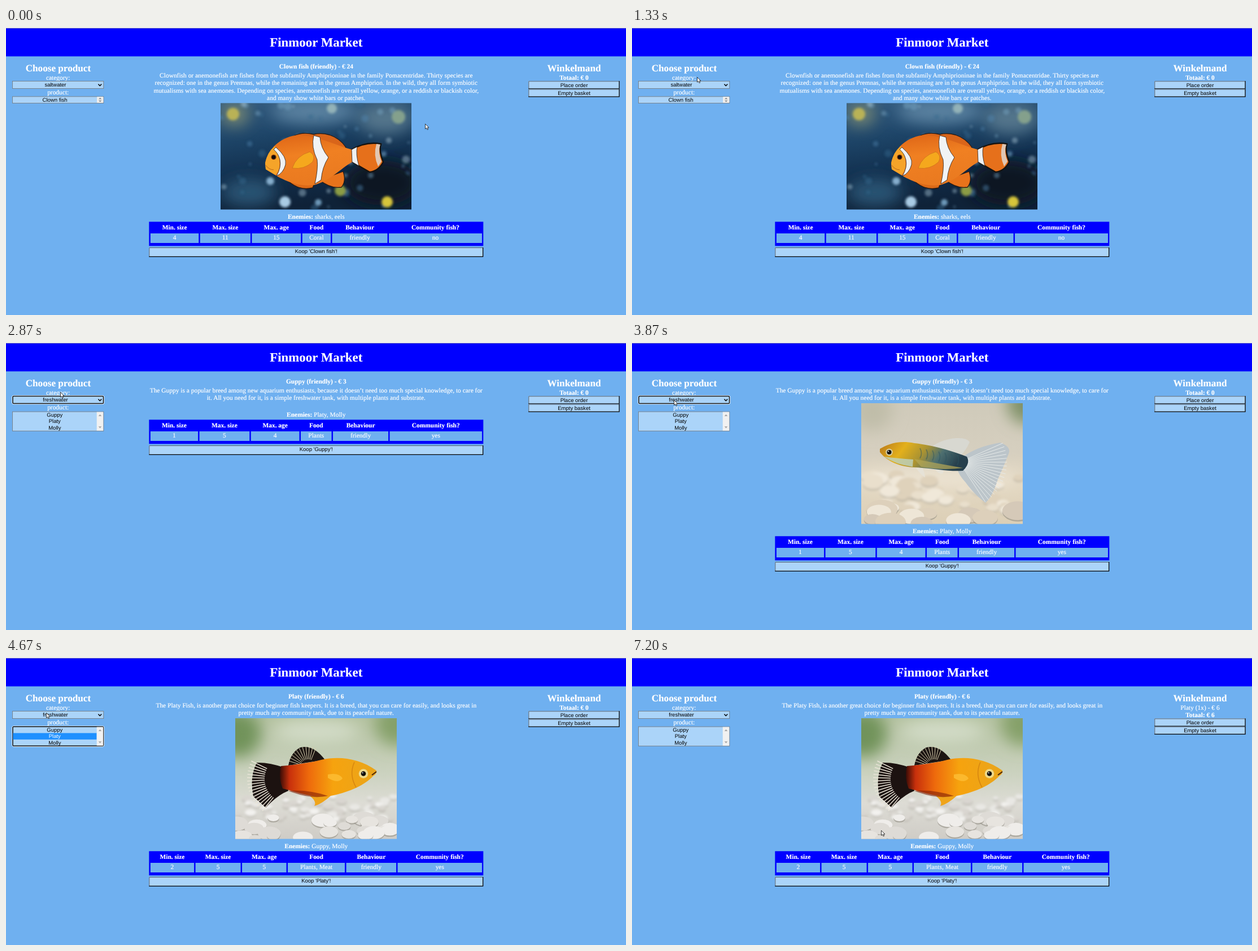
Animation, 1098 px wide and 510 px high, one loop 8 s. Source, as an HTML page:

```html
<!DOCTYPE html>
<html lang="en">
<head>
<meta charset="utf-8">
<title>Finmoor Market</title>
<style>
  html, body { margin: 0; width: 100%; height: 100%; overflow: hidden; background: #6fb0f0; }
  #stage { display: block; width: 100vw; height: 100vh; }
  text {
    font: 11.44px "Liberation Serif", "Times New Roman", serif; text-rendering: geometricPrecision;
    fill: #fff; stroke: #fff; stroke-width: .18px; text-anchor: middle;
  }
  .b { font-weight: bold; }
  .h1 { font-size: 22.87px; font-weight: bold; }
  .h2 { font-size: 17.16px; font-weight: bold; }
  .ui { font: 9.53px "Liberation Sans", Arial, sans-serif; fill: #000; stroke: none; }
  .ui.on { fill: #fff; }
</style>
</head>
<body>
<svg id="stage" viewBox="0 0 1098 510">
  <defs>
    <filter id="soft" x="-50%" y="-50%" width="200%" height="200%"><feGaussianBlur stdDeviation="2"/></filter>
    <filter id="haze" x="-50%" y="-50%" width="200%" height="200%"><feGaussianBlur stdDeviation="14"/></filter>
    <filter id="shadow" x="-20%" y="-30%" width="140%" height="160%"><feGaussianBlur stdDeviation="3.2"/></filter>
    <linearGradient id="sea" x2=".25" y2="1">
      <stop offset="0" stop-color="#345c80"/><stop offset=".35" stop-color="#1d4467"/><stop offset=".65" stop-color="#12304f"/><stop offset="1" stop-color="#0f2238"/>
    </linearGradient>
    <linearGradient id="clownSkin" x2=".2" y2="1">
      <stop offset="0" stop-color="#dd6416"/><stop offset=".45" stop-color="#f08022"/><stop offset="1" stop-color="#ea7a20"/>
    </linearGradient>
    <linearGradient id="sand" x2="0" y2="1">
      <stop offset="0" stop-color="#cfcaba"/><stop offset=".4" stop-color="#d6cfbf"/><stop offset=".65" stop-color="#e3d8c3"/><stop offset="1" stop-color="#dccfb6"/>
    </linearGradient>
    <linearGradient id="guppySkin" x2="1" y2=".25">
      <stop offset="0" stop-color="#b9781a"/><stop offset=".3" stop-color="#e3b01c"/><stop offset=".55" stop-color="#a99232"/>
      <stop offset=".75" stop-color="#4d6f70"/><stop offset="1" stop-color="#263f4c"/>
    </linearGradient>
    <linearGradient id="pond" x2="0" y2="1">
      <stop offset="0" stop-color="#b4c2a0"/><stop offset=".45" stop-color="#cbd2bf"/><stop offset=".7" stop-color="#dddcd5"/><stop offset="1" stop-color="#cfccc6"/>
    </linearGradient>
    <linearGradient id="platySkin" x2="1">
      <stop offset="0" stop-color="#3a0c06"/><stop offset=".1" stop-color="#c8300c"/><stop offset=".3" stop-color="#ee6a0c"/>
      <stop offset=".55" stop-color="#f6a30e"/><stop offset="1" stop-color="#e9a51c"/>
    </linearGradient>
  </defs>

  <rect width="1098" height="510" fill="#6fb0f0"/>
  <rect width="1098" height="50.4" fill="#00f"/>
  <rect width="1098" height="1" fill="#6d6fc4"/>
  <text class="h1" x="549.3" y="33.4">Finmoor Market</text>
  <text class="h2" x="92.4" y="77">Choose product</text>
  <text x="92.2" y="91.5">category:</text>
  <text x="92.2" y="118.3">product:</text>
  <text class="h2" x="1006" y="77">Winkelmand</text>
  <g id="view"></g>
  <path id="cursor" d="M.5.5V9.4L2.6 7.5 4.1 10.8 5.6 10.1 4.2 7H7Z" fill="#fff" stroke="#111" stroke-width=".8"/>
</svg>
<script>
const LIGHT = '#abd4f9', PAGE = '#6fb0f0', MARK = '#1e90ff';
const PERIOD = 8000, FRAME = 1000 / 15;

const rect = (x, y, w, h, fill, extra = '') =>
  `<rect x="${x}" y="${y}" width="${w}" height="${h}" fill="${fill}" ${extra}/>`;
const text = (x, y, s, cls = '') => `<text class="${cls}" x="${x}" y="${y}">${s}</text>`;
const path = (d, fill, extra = '') => `<path d="${d}" fill="${fill}" ${extra}/>`;
const dot = (x, y, r, fill, extra = '') => `<circle cx="${x}" cy="${y}" r="${r}" fill="${fill}" ${extra}/>`;
const oval = (x, y, rx, ry, fill, extra = '') =>
  `<ellipse cx="${x}" cy="${y}" rx="${rx}" ry="${ry}" fill="${fill}" ${extra}/>`;
const repeat = (n, fn) => Array.from({ length: n }, (_, i) => fn(i)).join('');

function button(x, y, w, h, label, baseline, pressed) {
  const [a, b] = pressed ? ['#000', '#5a6470'] : ['#5a6470', '#000'];
  return rect(x, y, w, h, LIGHT)
    + path(`M${x + .5} ${y + h}V${y + .5}H${x + w}`, 'none', `stroke="${a}" stroke-width="1"`)
    + path(`M${x} ${y + h - .65}H${x + w - .65}V${y}`, 'none', `stroke="${b}" stroke-width="1.3"`)
    + text(x + w / 2, baseline, label, 'ui');
}

function field(y, h, focused) {
  return focused
    ? rect(10.8, y - .7, 162.9, h + 1.4, 'none', 'rx="2.5" stroke="#fff" stroke-width="1"')
      + rect(12, y + .4, 160.5, h - .8, LIGHT, 'rx="1.6" stroke="#101010" stroke-width="1.5"')
    : rect(11.4, y + .4, 161.4, h - .8, LIGHT, 'stroke="#767676" stroke-width=".8"');
}

function random(seed) {
  return () => (seed = seed * 16807 % 2147483647) / 2147483647;
}

function stones(seed, n, box, size, colors) {
  const rnd = random(seed), [x, y, w, h] = box;
  return repeat(n, i => {
    const r = size * (.6 + rnd() * .7), cx = x + rnd() * w, cy = y + h * i / n;
    return oval(cx, cy + 2, r, r * .62, '#8f8a80', 'opacity=".55"') + oval(cx, cy, r, r * .6, colors[i % colors.length]);
  });
}

function rays(cx, cy, r0, r1, from, to, n, color, width) {
  return repeat(n, i => {
    const a = (from + (to - from) * i / (n - 1)) * Math.PI / 180, c = Math.cos(a), s = Math.sin(a);
    return path(`M${cx + r0 * c} ${cy + r0 * s}L${cx + r1 * c} ${cy + r1 * s}`, 'none',
      `stroke="${color}" stroke-width="${width}"`);
  });
}

const photo = (x, y, w, h, art) =>
  `<svg x="${x}" y="${y}" width="${w}" height="${h}" viewBox="${x} ${y} ${w} ${h}">${art}</svg>`;

function clownPhoto() {
  const rnd = random(77), tones = ['#4d83ad', '#7ba6c4', '#37698f', '#a9c5d4'];
  const bokeh = repeat(60, i => dot(380 + rnd() * 338, 133 + rnd() * 190, 2 + rnd() * 5, tones[i % 4], 'opacity=".45"'));
  const edge = 'stroke="#2a1a12" stroke-width="1.3"', rim = 'stroke="#2b211c" stroke-width=".8"';
  return photo(380, 133.5, 338, 189, rect(380, 133, 338, 190, 'url(#sea)')
    + `<g filter="url(#haze)">${oval(545, 148, 75, 22, '#5c83a2')}${oval(672, 160, 50, 28, '#54768c')}`
    + `${oval(405, 153, 24, 20, '#7b8a72')}${oval(430, 292, 48, 24, '#2a5575')}${oval(665, 275, 66, 40, '#0a1524')}</g>`
    + `<g filter="url(#soft)">${bokeh}${dot(402, 153, 11, '#b9b257')}${dot(577, 143, 9, '#93b2b8')}`
    + `${dot(695, 158, 12, '#84a08c')}${dot(592, 289, 10, '#8b9c45')}${dot(675, 309, 10, '#d6c53a')}`
    + `${dot(494, 309, 10, '#a9cbe4')}${dot(468, 272, 7, '#86aecd')}${dot(553, 310, 6, '#6d98b8')}</g>`
    + path('M509 192Q525 184 545 189Q558 186 573 190Q591 196 602 212L594 222 520 200Z', '#d9651a', edge)
    + path('M555 270Q578 262 597 255Q603 272 594 283Q575 286 555 270Z', '#e8731b', edge)
    + path('M500 272Q520 290 543 284L548 272Z', '#dc6a18', edge)
    + path('M612 216Q638 201 664 206Q660 218 668 238Q660 254 644 256Q628 247 612 237Z', '#e6701b', 'stroke="#17130f" stroke-width="2.4"')
    + path('M459 240C464 215 487 191 522 190C558 194 588 210 616 217L617 236C596 246 576 271 546 279C508 284 478 262 460 251Z', 'url(#clownSkin)')
    + path('M459 240Q463 220 476 210Q484 226 484 238Q486 252 477 261L460 251Z', '#f5a429')
    + path('M478 212Q498 229 495 243Q491 258 479 263Q488 247 485 234Q482 222 474 216Z', '#eef1f3', rim)
    + path('M545 191L556 194Q557 213 571 230Q560 247 558 270L547 277Q553 250 551 234Q540 212 545 191Z', '#f1f3f5', rim)
    + path('M612 216L622 211Q619 224 625 245L613 238Z', '#eef0f2', rim)
    + path('M656 206L663 207Q658 220 665 237L659 246Q650 226 656 206Z', '#dfe4e6', 'opacity=".75"')
    + path('M507 249Q514 227 538 220Q549 226 543 238Q528 252 507 249Z', '#f5a81d', 'stroke="#c8691a" stroke-width=".7"')
    + path('M460 244Q466 252 474 252', 'none', 'stroke="#b8651a" stroke-width="1"')
    + dot(474, 229.5, 4.6, '#7a2f0c') + dot(474, 229.5, 3.2, '#0d0c0c'));
}

function guppyPhoto() {
  return photo(406, 107, 286, 214.5, rect(406, 107, 286, 215, 'url(#sand)')
    + `<g filter="url(#haze)">${dot(700, 108, 36, '#7f9167')}${dot(425, 120, 36, '#c0bda9')}`
    + `${oval(540, 240, 150, 16, '#ece3d2')}</g>`
    + `<g filter="url(#soft)">${stones(31, 36, [406, 232, 286, 66], 15, ['#e9dfcc', '#dfd2bb', '#f0e8d9'])}</g>`
    + stones(9, 12, [406, 293, 286, 30], 24, ['#eee6d7', '#ddd0bb', '#d5c9b8'])
    + path('M522 191Q545 171 574 169Q593 168 598 176Q592 190 582 200Z', '#d9dad3', 'opacity=".9"')
    + path('M585 203Q610 184 652 177Q672 184 667 197Q658 220 648 242Q638 274 626 284Q606 269 591 248Q578 234 576 223Z', '#bcc5ca')
    + rays(580, 212, 14, 84, -24, 57, 18, '#e7ebea', 1)
    + path('M501 219Q510 233 519 239Q518 228 513 219ZM535 223Q548 238 552 229L549 222Z', '#e6e2d7')
    + path('M439 188C452 181 470 172 500 178C535 182 570 193 593 202Q600 214 586 227C560 229 530 222 500 221C475 220 452 211 439 194Z', 'url(#guppySkin)')
    + path('M446 202Q470 205 498 207L497 220Q468 216 446 202Z', '#bfd0b8', 'opacity=".85"')
    + path('M500 206Q545 215 586 222Q550 227 512 220Z', '#b7a956', 'opacity=".7"')
    + repeat(7, i => path(`M${510 + i * 11} ${187 + i * 2}q5 9 0 18`, 'none', 'stroke="#2d565f" stroke-width="2" opacity=".45"'))
    + dot(455.5, 194, 6.2, '#d8cfa4') + dot(455.5, 194, 4, '#15130f') + dot(454, 192.5, 1, '#fff'));
}

function platyPhoto() {
  return photo(406, 107, 286, 214.5, rect(406, 107, 286, 215, 'url(#pond)')
    + `<g filter="url(#haze)">${dot(410, 135, 42, '#71935a')}${dot(692, 118, 38, '#85a069')}`
    + `${oval(550, 130, 75, 20, '#d3dcc8')}</g>`
    + `<g filter="url(#soft)">${stones(53, 65, [406, 245, 286, 44], 8, ['#e9e8e4', '#d9d6d0', '#f3f2ef'])}</g>`
    + stones(17, 26, [406, 284, 286, 38], 17, ['#efedea', '#dedbd6', '#e7e4df'])
    + path('M500 191Q504 168 521 159Q544 153 565 181Z', '#1d1613')
    + rays(535, 194, 14, 37, 198, 292, 11, '#d9cfaf', 1)
    + path('M494 195Q465 185 444 186Q431 211 438 246L460 266Q480 244 500 236Z', '#1c1210')
    + rays(500, 215, 42, 73, 129, 206, 17, '#eae5d8', 1.5)
    + path('M538 245Q551 255 546 263Q560 259 576 244Z', '#efa41a')
    + path('M487 192C510 190 535 187 558 181C590 174 625 178 656 200Q657 206 650 210C635 226 610 237 580 244C548 251 520 239 490 232Q482 212 487 192Z', 'url(#platySkin)')
    + path('M500 236Q535 233 570 245Q540 252 500 236Z', '#812108', 'opacity=".6"')
    + path('M570 207Q590 203 596 214Q588 224 570 213Z', '#ffc43b', 'opacity=".7"')
    + path('M617 185Q607 207 620 230', 'none', 'stroke="#cb780d" stroke-width="1.5" opacity=".7"')
    + path('M648 208L656 202', 'none', 'stroke="#4a2308" stroke-width="2"')
    + dot(633, 205.5, 8.3, '#eed98a') + dot(633, 205.5, 4.3, '#0d0b0a') + dot(631.6, 204, 1, '#fff'));
}

const headings = ['Min. size', 'Max. size', 'Max. age', 'Food', 'Behaviour', 'Community fish?'];
const products = {
  clown: {
    name: 'Clown fish', price: 24, enemies: 'sharks, eels', photo: clownPhoto(), shift: 0,
    lines: ['Clownfish or anemonefish are fishes from the subfamily Amphiprioninae in the family Pomacentridae. Thirty species are',
      'recognized: one in the genus Premnas, while the remaining are in the genus Amphiprion. In the wild, they all form symbiotic',
      'mutualisms with sea anemones. Depending on species, anemonefish are overall yellow, orange, or a reddish or blackish color,',
      'and many show white bars or patches.'],
    values: [4, 11, 15, 'Coral', 'friendly', 'no'], splits: [342.5, 434.2, 523.5, 576.3, 676.8]
  },
  guppy: {
    name: 'Guppy', price: 3, enemies: 'Platy, Molly', photo: guppyPhoto(), shift: -1,
    lines: ['The Guppy is a popular breed among new aquarium enthusiasts, because it doesn’t need too much special knowledge, to care for',
      'it. All you need for it, is a simple freshwater tank, with multiple plants and substrate.'],
    values: [1, 5, 4, 'Plants', 'friendly', 'yes'], splits: [341.3, 432.5, 520.8, 577.8, 678.3]
  },
  platy: {
    name: 'Platy', price: 6, enemies: 'Guppy, Molly', photo: platyPhoto(), shift: -1,
    lines: ['The Platy Fish, is another great choice for beginner fish keepers. It is a breed, that you can care for easily, and looks great in',
      'pretty much any community tank, due to its peaceful nature.'],
    values: [2, 5, 5, 'Plants, Meat', 'friendly', 'yes'], splits: [334.3, 416.8, 497.8, 601.3, 692.3]
  }
};

function details({ product, loaded, pressed }) {
  const p = products[product], dy = loaded ? p.shift : -208;
  const edges = [254.6, ...p.splits, 844.2];
  const cells = headings.map((head, i) => {
    const left = edges[i] + 1.25, width = edges[i + 1] - edges[i] - 2.5, mid = left + width / 2;
    return text(mid, 357.5 + dy, head, 'b') + rect(left, 365 + dy, width, 17, PAGE) + text(mid, 376.2 + dy, p.values[i]);
  }).join('');
  return text(549.3, 72.4, `${p.name} (friendly) - € ${p.price}`, 'b')
    + p.lines.map((line, i) => text(549.3, 88.2 + i * 13.2, line)).join('')
    + (loaded ? p.photo : '')
    + text(549.3, 338.8 + dy, `<tspan class="b">Enemies:</tspan> ${p.enemies}`)
    + rect(253.3, 344.3 + dy, 592, 43, '#00f') + cells
    + button(253.3, 390 + dy, 592, 17, `Koop '${p.name}'!`, 400 + dy, pressed);
}

function productList({ product, listFocus, marked, pressed }) {
  if (product === 'clown') {
    return field(121.5, 12.3, false) + text(86.5, 130.6, 'Clown fish', 'ui')
      + rect(161, 122.3, 11.4, 10.7, '#eeeeee', 'rx="1"')
      + path('M164 126.6L166.7 123.8 169.4 126.6ZM164 128.8L166.7 131.6 169.4 128.8Z', '#8a8a8a');
  }
  return field(121.7, 35, listFocus)
    + (marked ? rect(12.4, 133.4, 148.2, 11.4, pressed ? '#cecece' : MARK) : '')
    + ['Guppy', 'Platy', 'Molly'].map((s, i) =>
      text(86.3, 130.6 + i * 11.45, s, i === 1 && marked && !pressed ? 'ui on' : 'ui')).join('')
    + rect(160.7, 122.6, 11.5, 33.2, '#f1f1f1')
    + path('M163.7 130L166.5 126.7 169.3 130ZM163.7 148.3L166.5 151.6 169.3 148.3Z', '#a6a6a6');
}

function popup(row) {
  return rect(12, 109, 161, 59, '#000', 'opacity=".4" filter="url(#shadow)"')
    + rect(12, 108.4, 161, 59, LIGHT, 'stroke="#555" stroke-width=".7"')
    + rect(12.4, 109 + row * 11.5, 160.2, 11.5, MARK)
    + ['saltwater', 'freshwater', 'plants', 'food', 'accessories'].map((s, i) =>
      text(92.5, 118 + i * 11.5, s, i === row ? 'ui on' : 'ui')).join('');
}

function basket({ bought }) {
  const dy = bought ? 13.2 : 0;
  return (bought ? text(1006, 91.5, 'Platy (1x) - € 6') : '')
    + text(1006, 91.5 + dy, `Totaal: € ${bought ? 6 : 0}`, 'b')
    + button(925.3, 94.3 + dy, 161.4, 14.2, 'Place order', 104.7 + dy)
    + button(925.3, 108.6 + dy, 161.4, 14.2, 'Empty basket', 119 + dy);
}

function render(s) {
  return details(s) + field(94.2, 13.8, s.selectFocus)
    + text(87.5, 104.4, s.product === 'clown' ? 'saltwater' : 'freshwater', 'ui')
    + path('M163.4 99.7L166.3 102.7 169.2 99.7', 'none', 'stroke="#000" stroke-width="1.5"')
    + productList(s) + basket(s) + (s.open ? popup(s.row) : '');
}

// Pointer stops: time, x, y
const stops = [
  [0, 742, 170], [400, 742, 170], [600, 640, 250], [800, 440, 313], [1000, 235, 215], [1267, 118, 96],
  [1333, 115, 87], [1667, 112, 68], [2133, 112, 68], [2533, 96, 87], [3467, 96, 87], [3867, 74, 101],
  [4133, 71, 100], [4267, 71, 100], [4333, 71, 97], [5333, 71, 97], [5667, 225, 165], [5933, 410.5, 247],
  [6067, 552, 310], [6200, 444, 305], [6267, 461, 310], [6400, 461, 310], [6467, 449, 308],
  [6533, 438, 307], [6600, 441, 306], [PERIOD, 441, 306]
];

function pointer(t) {
  const i = Math.max(1, stops.findIndex(s => s[0] >= t));
  const [t0, x0, y0] = stops[i - 1], [t1, x1, y1] = stops[i];
  const f = (t - t0) / (t1 - t0);
  return [x0 + (x1 - x0) * f, y0 + (y1 - y0) * f];
}

function stateAt(t) {
  const between = (a, b) => t >= a && t < b;
  return {
    product: t < 2860 ? 'clown' : t < 4590 ? 'guppy' : 'platy',
    loaded: !between(2860, 2930) && !between(4590, 4660),
    open: between(1860, 2860),
    row: t < 2460 ? 0 : 1,
    selectFocus: between(2860, 4530),
    listFocus: between(4530, 7130),
    marked: between(4530, 7195),
    pressed: between(7130, 7195),
    bought: t >= 7195
  };
}

const view = document.getElementById('view'), cursor = document.getElementById('cursor');
let shown = '';

function draw(now) {
  const t = Math.floor((now % PERIOD + 5) / FRAME) * FRAME;
  const state = stateAt(t), key = JSON.stringify(state);
  if (key !== shown) {
    view.innerHTML = render(state);
    shown = key;
  }
  cursor.setAttribute('transform', `translate(${pointer(Math.min(t, PERIOD))})`);
  requestAnimationFrame(draw);
}
draw(performance.now());
</script>
</body>
</html>
```
